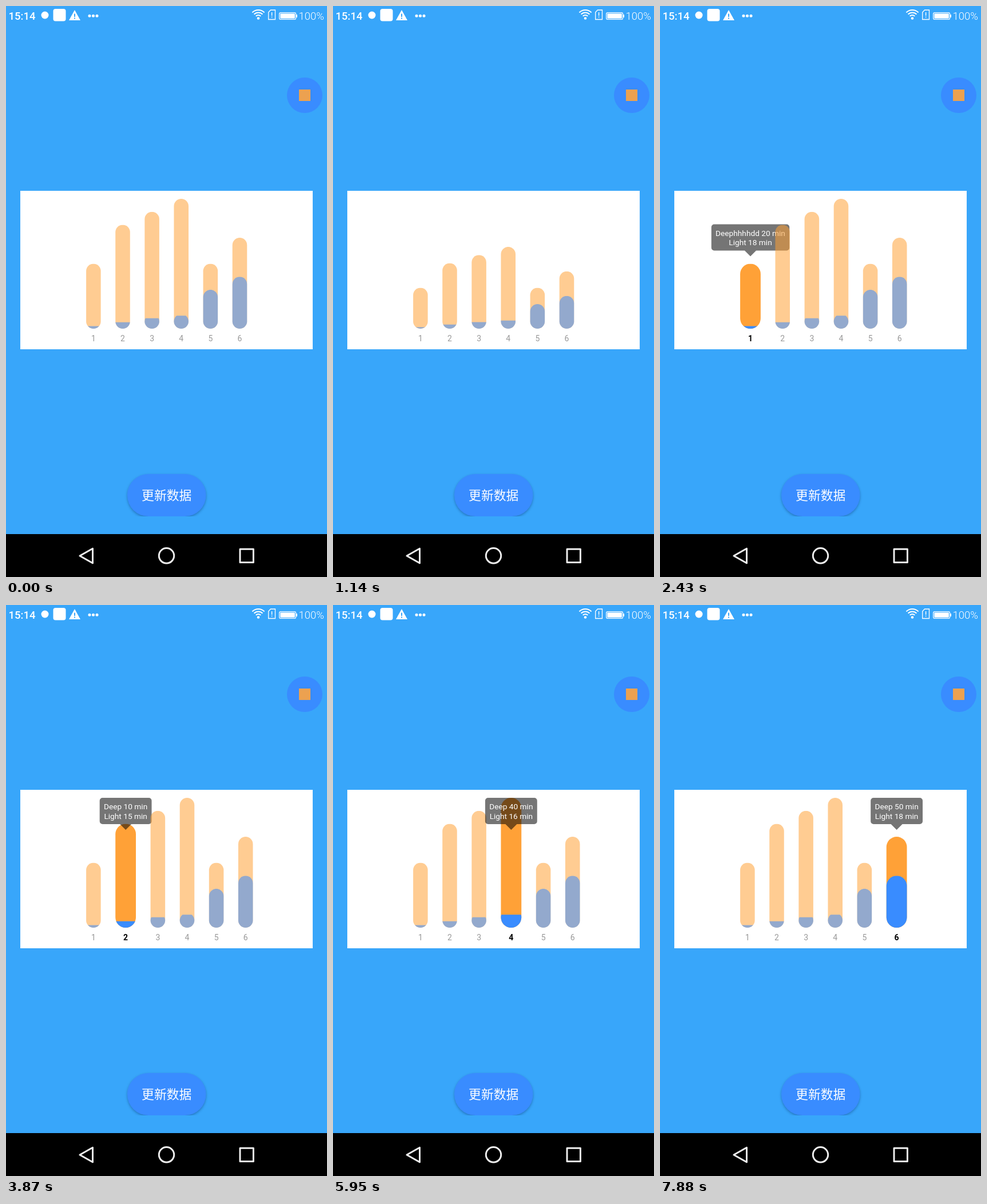
An HTML page with a canvas that plays this animation: 561 by 998 pixels, repeating every 8000 ms.

```html
<!DOCTYPE html>
<html lang="zh">
<head>
<meta charset="utf-8">
<title>Bar chart</title>
<style>
html, body { margin: 0; width: 100%; height: 100%; overflow: hidden; background: #38a6fa; }
canvas { display: block; width: 561px; height: 998px; }
</style>
</head>
<body>
<canvas id="stage" width="561" height="998"></canvas>
<script>
const ctx = document.getElementById('stage').getContext('2d');
const LOOP = 8000;
const SKY = '#38a6fa', BLUE = '#398cff', ORANGE = '#ffa137', WHITE = '#fff';
const FADED = 0.54;
const BASE = 564, FULL = 227, TOP = BASE - FULL, LEFT = 140.1, BAR = 25.56, WIDE = 35.8;

const bars = [
  { total: 0.5, part: 0.02, tip: ['Deephhhhdd 20 min', 'Light 18 min'] },
  { total: 0.8, part: 0.05, tip: ['Deep 10 min', 'Light 15 min'] },
  { total: 0.9, part: 0.08, tip: ['Deep 30 min', 'Light 15 min'] },
  { total: 1.0, part: 0.1, tip: ['Deep 40 min', 'Light 16 min'] },
  { total: 0.5, part: 0.3, tip: ['5 min', '8 min'] },
  { total: 0.7, part: 0.4, tip: ['Deep 50 min', 'Light 18 min'] }
];
const selectTimes = [2430, 3870, 4830, 5950, 6920, 7880];

// The chart refreshes on 160 ms ticks, then rests just short of full height.
const GROW = { from: 820, tick: 160, ticks: 3, start: 848, length: 500 };

function growth(t) {
  if (t < GROW.from || t >= selectTimes[0]) return 1;
  const tick = Math.min(GROW.ticks, Math.floor((t - GROW.from) / GROW.tick));
  const now = GROW.from + tick * GROW.tick;
  const k = Math.min(1, Math.max(0, (now - GROW.start) / GROW.length));
  return (1 - Math.cos(Math.PI * k)) / 2;
}

function text(str, x, y, font, color, align = 'center') {
  ctx.font = font;
  ctx.fillStyle = color;
  ctx.textAlign = align;
  ctx.fillText(str, x, y);
}

function roundRect(x, y, w, h, r, color) {
  ctx.fillStyle = color;
  ctx.beginPath();
  ctx.roundRect(x, y, w, h, r);
  ctx.fill();
}

function disc(x, y, r, color) {
  ctx.fillStyle = color;
  ctx.beginPath();
  ctx.arc(x, y, r, 0, Math.PI * 2);
  ctx.fill();
}

function polygon(points) {
  ctx.beginPath();
  points.forEach(([x, y]) => ctx.lineTo(x, y));
  ctx.closePath();
}

function stroke(color, width) {
  ctx.strokeStyle = color;
  ctx.lineWidth = width;
  ctx.stroke();
}

// A pill standing on the baseline; levels lower than its width get a flat top.
function pill(x, w, h, color) {
  if (h <= 0) return;
  const body = Math.max(h, w);
  ctx.save();
  ctx.beginPath();
  ctx.rect(x - 1, BASE - h, w + 2, h + 1);
  ctx.clip();
  roundRect(x, BASE - body, w, body, w / 2, color);
  ctx.restore();
}

function tooltip(lines, x, barTop) {
  const font = '13.7px Roboto, sans-serif';
  ctx.font = font;
  const w = Math.max(...lines.map(s => ctx.measureText(s).width)) + 14.6;
  const h = 46, r = 5, l = x - w / 2;
  const y = Math.max(TOP, barTop - 69);
  ctx.fillStyle = `rgba(0,0,0,${FADED})`;
  ctx.beginPath();
  ctx.roundRect(l, y, w, h, r);
  ctx.moveTo(x - 10, y + h);
  ctx.lineTo(x + 10, y + h);
  ctx.lineTo(x, y + h + 10);
  ctx.closePath();
  ctx.fill();
  lines.forEach((s, i) => text(s, x, y + 20.3 + i * 16.6, font, WHITE));
}

function chart(t) {
  const selected = selectTimes.filter(s => t >= s).length - 1;
  const grow = growth(t);
  let x = LEFT;
  ctx.fillStyle = WHITE;
  ctx.fillRect(25, 323, 511, 277);
  bars.forEach((bar, i) => {
    const on = i === selected;
    const w = on ? WIDE : BAR, mid = x + w / 2;
    const height = bar.total * FULL * grow;
    ctx.globalAlpha = on ? 1 : FADED;
    pill(x, w, height, ORANGE);
    pill(x, w, bar.part * FULL * grow, BLUE);
    ctx.globalAlpha = 1;
    text(i + 1, mid, 586, (on ? 'bold ' : '') + '14px Roboto, sans-serif', on ? '#000' : '#999');
    if (on) tooltip(bar.tip, mid, BASE - height);
    x += w + BAR;
  });
}

function statusBar() {
  text('15:14', 4.5, 24, '500 18.5px Roboto, sans-serif', WHITE, 'left');
  disc(68, 16, 6.5, WHITE);
  roundRect(82.5, 5, 22, 21.5, 4, WHITE);

  ctx.fillStyle = WHITE;
  polygon([[120, 7], [130, 25], [110, 25]]);
  ctx.fill();
  ctx.fillStyle = SKY;
  ctx.fillRect(119, 13.5, 2, 5.5);
  ctx.fillRect(119, 20.5, 2, 2);
  [146, 152.5, 159].forEach(x => disc(x, 17.3, 2.5, WHITE));

  [6, 10.5, 15].forEach(r => {
    ctx.beginPath();
    ctx.arc(441, 22, r, -Math.PI * 0.75, -Math.PI * 0.25);
    stroke(WHITE, 2);
  });
  disc(441, 21.5, 2.3, WHITE);

  polygon([[462.5, 7], [470.5, 7], [470.5, 23.5], [458.7, 23.5], [458.7, 11]]);
  stroke(WHITE, 1.3);
  ctx.fillStyle = WHITE;
  ctx.fillRect(463.9, 11, 1.4, 6);
  ctx.fillRect(463.9, 18.5, 1.4, 1.6);

  ctx.beginPath();
  ctx.roundRect(477.6, 11.6, 29, 11.8, 2.5);
  stroke(WHITE, 1.2);
  roundRect(479.3, 13.3, 25.6, 8.4, 1, WHITE);
  ctx.fillRect(507, 15, 2, 5);
  text('100%', 556, 24, '300 18.5px Roboto, sans-serif', WHITE, 'right');
}

function buttons() {
  disc(522, 156, 31, BLUE);
  ctx.fillStyle = '#eca150';
  ctx.fillRect(512, 146, 20, 20);

  ctx.save();
  ctx.beginPath();
  ctx.rect(200, 800, 162, 92);
  ctx.clip();
  ctx.shadowColor = 'rgba(0,30,80,0.35)';
  ctx.shadowBlur = 4;
  ctx.shadowOffsetY = 2;
  roundRect(212, 818, 137.5, 74, 37, BLUE);
  ctx.restore();
  text('更新数据', 280.7, 863, '500 21.8px "Noto Sans CJK SC", "Noto Sans CJK", sans-serif', WHITE);
}

function navBar() {
  const ink = '#eee';
  ctx.fillStyle = '#000';
  ctx.fillRect(0, 923, 561, 75);
  ctx.lineJoin = 'round';
  polygon([[129, 961], [151.5, 948.3], [151.5, 973.7]]);
  stroke(ink, 3);
  ctx.beginPath();
  ctx.arc(280.5, 960.8, 13.2, 0, Math.PI * 2);
  stroke(ink, 3);
  ctx.strokeRect(409, 949.2, 23.4, 23.4);
  ctx.lineJoin = 'miter';
}

function frame() {
  ctx.fillStyle = SKY;
  ctx.fillRect(0, 0, 561, 998);
  statusBar();
  chart(performance.now() % LOOP);
  buttons();
  navBar();
  requestAnimationFrame(frame);
}
frame();
</script>
</body>
</html>
```
